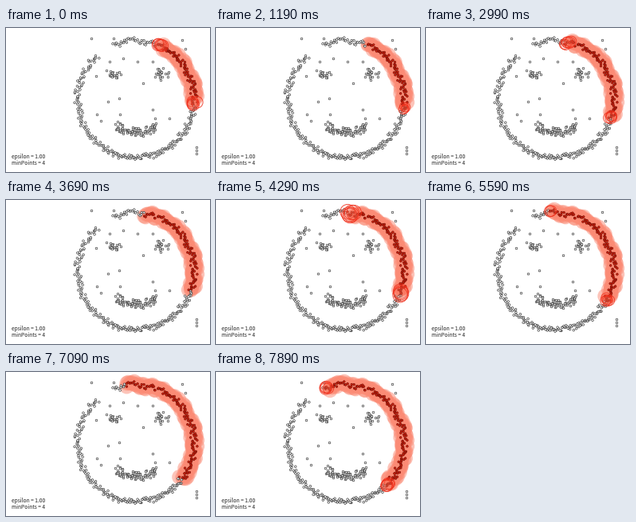
These frames come from a looping animation (256x180 px, 7990 ms). A matplotlib script:

```python
import numpy as np
import matplotlib.pyplot as plt
from matplotlib.animation import FuncAnimation

W, H, DPI = 256, 180, 100
INTERVAL, FRAMES = 34, 235          # 7990 ms
CX, CY, R = 163, 89, 73             # face outline
EPS = 9.3                           # neighbourhood radius in pixels
PT = 72 / DPI

# Start of each expansion wave (ms) and the angles reached by its two fronts,
# in degrees clockwise from the top.
WAVE = np.array([0, 1090, 1890, 2690, 3590, 4590, 5440, 6200, 6990, 7690, 8490])
TOP = np.array([27, 21, 20, 15, 8, 1, -4, -7, -11, -17, -22])
LOW = np.array([92, 96, 101, 106, 110, 114, 118, 121, 128, 132, 137])

rng = np.random.default_rng(12)


def arc(lo, hi, n, spread=4):
    """Noisy points along the face outline; returns angles and positions."""
    deg = lo + (np.arange(n) + rng.uniform(0, 1, n)) * (hi - lo) / n
    rad = R + np.clip(rng.normal(0, spread * 0.55, n), -spread, spread)
    a = np.radians(deg)
    return deg, np.column_stack([CX + rad * np.sin(a), CY - rad * np.cos(a)])


def blob(x, y, sx, sy, n):
    return rng.normal((x, y), (sx, sy), (n, 2))


def mouth(n):
    u = rng.uniform(-1, 1, n)
    x = CX + 26 * u
    y = 130 - 9 * u**2 + np.clip(rng.normal(0, 3, n), -6, 6)
    return np.column_stack([x, y])


def wave_of(deg):
    """Index of the wave that expands a point; -1 when already expanded."""
    up = np.searchsorted(-TOP, -deg, side="left") - 1
    down = np.searchsorted(LOW, deg, side="left") - 1
    return np.where(deg < 60, up, down)


parts = [arc(-23, 27, 42), arc(27, 137, 122), arc(137, 215, 90),
         arc(215, 319, 92)]
deg = np.concatenate([p[0] for p in parts])
ring = np.concatenate([p[1] for p in parts])
wave = wave_of(deg)

strays = np.array([
    (107, 13), (135, 13), (221, 15), (225, 26), (147, 38), (165, 42),
    (184, 42), (130, 42), (113, 60), (172, 69), (128, 92), (142, 88),
    (184, 102), (114, 108), (119, 116), (143, 108), (187, 113), (205, 113),
    (239, 149), (239, 153), (239, 157)])
others = np.concatenate([
    blob(133, 58, 4.5, 3.5, 20), blob(194, 57, 4, 4, 22), mouth(88), strays])

delay = rng.uniform(0, 0.08, len(ring))

fig = plt.figure(figsize=(W / DPI, H / DPI), dpi=DPI, facecolor="white")
ax = fig.add_axes([0, 0, 1, 1])
ax.set(xlim=(0, W), ylim=(H, 0))
ax.axis("off")


def size(radius):
    return (2 * radius * PT) ** 2


dot = dict(s=size(1.3), linewidths=0.65 * PT)
discs = ax.scatter([], [], c="#fb8b75", alpha=0.5, linewidths=0, zorder=1)
ax.scatter(*others.T, facecolors="white", edgecolors="#333333", zorder=2, **dot)
dots = ax.scatter(*ring.T, facecolors="white", edgecolors="#333333", zorder=2,
                  **dot)
rings = ax.scatter([], [], facecolors=(0.98, 0.4, 0.3, 0.12),
                   edgecolors=(0.94, 0.18, 0.1, 0.85), linewidths=0.9 * PT,
                   zorder=3)

for y, label in ((163, "epsilon = 1.00"), (171, "minPoints = 4")):
    ax.text(7, y, label, family="Noto Sans CJK JP", size=6.65 * PT,
            color="#222222", va="baseline")


def clock(i):
    """Time in ms, held at first and then advancing in steps of 100."""
    t = i * INTERVAL + INTERVAL // 2
    return 290 + 100 * max(0, (t - 290) // 100)


def draw(i):
    t = clock(i)
    now = np.searchsorted(WAVE, t, side="right") - 1
    frac = (t - WAVE[now]) / (WAVE[now + 1] - WAVE[now])
    p = (frac - delay) / 0.8
    current = wave == now
    done = (wave < now) | (current & (p >= 1))
    # points past the last front stay untouched
    done &= (deg > TOP[-1]) & (deg < LOW[-1])
    active = current & (p > 0) & (p < 1)

    discs.set_offsets(ring[done])
    discs.set_sizes(np.full(done.sum(), size(EPS)))

    radius = EPS * (0.4 + 0.6 * (1 - (1 - p[active]) ** 3))
    rings.set_offsets(ring[active])
    rings.set_sizes(size(radius))

    hot = done | active
    dots.set_facecolors(np.where(hot[:, None], (0.85, 0.14, 0.06), (1, 1, 1)))
    dots.set_edgecolors(np.where(hot[:, None], (0.45, 0.05, 0.02),
                                 (0.2, 0.2, 0.2)))
    return discs, dots, rings


anim = FuncAnimation(fig, draw, frames=FRAMES, interval=INTERVAL, repeat=True,
                     repeat_delay=0, blit=False)
plt.show()
```
